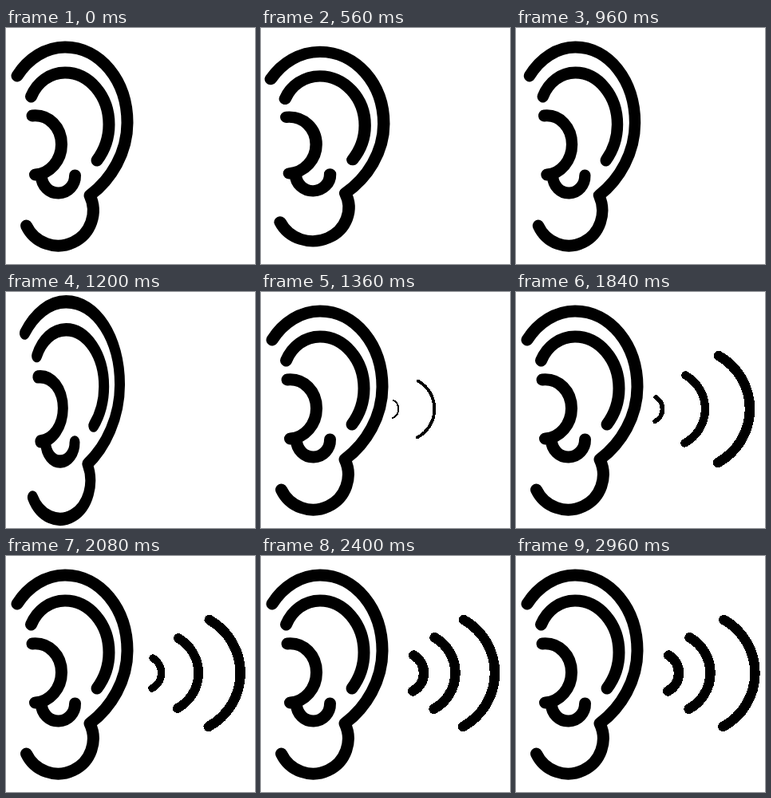
These frames come from a looping animation (312x296 px, 3.04 s). An HTML page:

```html
<!DOCTYPE html>
<html>
<head>
<meta charset="utf-8">
<style>
html, body { margin: 0; width: 100%; height: 100%; overflow: hidden; background: #fff; }
svg { display: block; width: 312px; height: 296px; }
path { fill: none; stroke: #000; stroke-width: 15; stroke-linecap: round; stroke-linejoin: round; }
.wave { shape-rendering: crispEdges; }
</style>
</head>
<body>
<svg viewBox="0 0 312 296">
  <g id="ear">
    <path d="M14 60C28 38 50 24 74 24C118 24 152 66 152 119C152 156 132 190 105 210A44 44 0 0 1 25.5 248"/>
    <path d="M31.5 86C39 68 55 56 74 56C104 56 129 85 129 121C129 138 123 154 114 166"/>
    <path d="M33 110C54 108 69.5 125 69.5 146C69.5 166 55 183 36.5 184"/>
    <path d="M44.5 186A21 21.5 0 0 0 86.5 185"/>
  </g>
  <path class="wave"/>
  <path class="wave"/>
  <path class="wave"/>
</svg>
<script>
const LOOP = 3040, STEP = 80, HOLD = 400, MID_Y = 147;
const ear = document.getElementById('ear');
const paths = document.querySelectorAll('.wave');

// Each wave grows while it travels outwards to its apex.
const waves = [
  { apex: 204, half: 22.4, start: 1280, end: 2240, travel: 32, power: 1.9, drift: 0 },
  { apex: 243.5, half: 44.8, start: 1340, end: 2240, travel: 36, power: 0.34, drift: 0 },
  { apex: 299.5, half: 67, start: 1500, end: 1840, travel: 26, power: 0.5, drift: 1 }
];

const progress = (t, from, to) => Math.min(1, Math.max(0, (t - from) / (to - from)));
const swing = u => Math.sin(2 * Math.PI * u);

function drawEar(t) {
  const u = progress(t, 320, 1360);
  const sx = 1 + 0.19 * u ** 1.3 * swing(u ** 1.16);
  const sy = 1 - (0.055 + 0.05 * u) * swing(u ** 1.43);
  ear.setAttribute('transform', `translate(83 148.5) scale(${sx} ${sy}) translate(-83 -148.5)`);
}

// Small sway, then a slide to the resting place.
function drift(t) {
  const sway = 4 * Math.sin(Math.PI * (t - 1840) / 280) ** 2;
  return sway - 6.5 * (1 - progress(t, 2640, 2960));
}

function drawWave(wave, path, t) {
  path.style.display = t >= wave.start ? '' : 'none';
  const back = wave.travel * (1 - progress(t, wave.start, wave.end) ** wave.power);
  const half = wave.half - 0.36 * back;
  const x = wave.apex - back + wave.drift * drift(t) - 0.59 * half;
  const r = 1.143 * half;
  path.setAttribute('d', `M${x + 0.5} ${MID_Y - half}A${r} ${r} 0 0 1 ${x - 0.5} ${MID_Y + half}`);
  path.style.strokeWidth = 12.5 - 0.33 * back;
}

function draw(now) {
  const time = now % LOOP;
  const t = time < HOLD ? 0 : Math.floor(time / STEP) * STEP;
  drawEar(t);
  waves.forEach((wave, i) => drawWave(wave, paths[i], t));
}

const start = performance.now();
function tick() {
  draw(performance.now() - start);
  requestAnimationFrame(tick);
}
tick();
</script>
</body>
</html>
```
